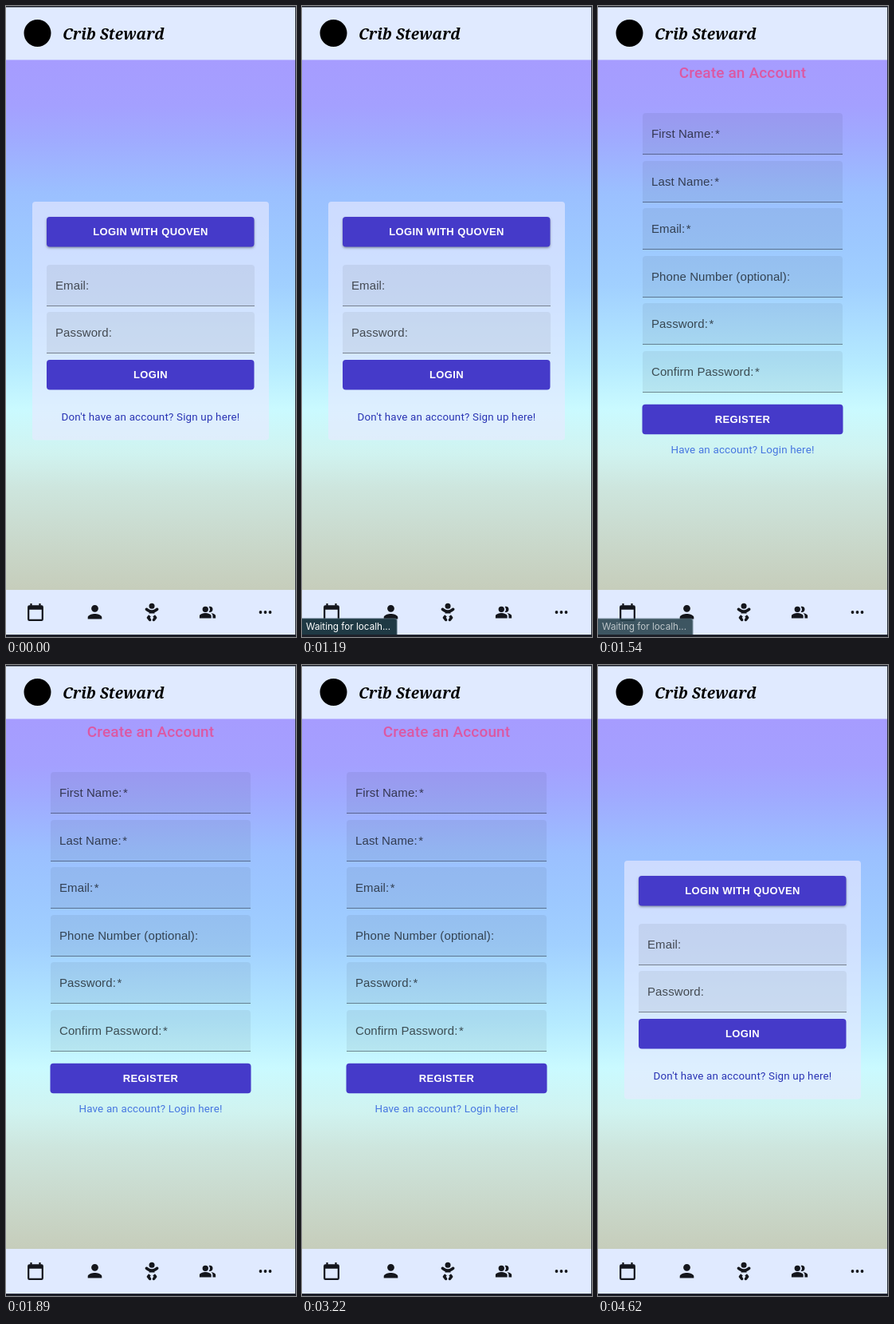
Recreate the animation shown at these times as an HTML page with a canvas. Size 364 by 790 pixels, loop 4.69 s.

```html
<!DOCTYPE html>
<html lang="en">
<head>
<meta charset="utf-8">
<title>Crib Steward</title>
<style>
  html, body { margin: 0; width: 100%; height: 100%; overflow: hidden; background: #e0eaff; }
  canvas { display: block; width: 364px; height: 790px; }
</style>
</head>
<body>
<canvas id="stage"></canvas>
<script>
const W = 364, H = 790, LOOP = 4690, STEP = 70, MID = 181.5;
// The tapped link fades, the status bubble comes up, then the next page is painted.
const TAP = 840, TAP_FADE = 910, TAP_END = 1050;
const STATUS_IN = 1050, STATUS_FULL = 1190, STATUS_FADE = 1470, STATUS_END = 1680;
const REGISTER = 1260, BACK = 3640;
const INK = '#14161c', BAR = '#e0eaff';
const SANS = '"Liberation Sans", Arial, sans-serif';
const ROUND = 'Roboto, sans-serif';

const canvas = document.getElementById('stage');
const ratio = window.devicePixelRatio || 1;
canvas.width = W * ratio;
canvas.height = H * ratio;
const ctx = canvas.getContext('2d');

const sky = ctx.createLinearGradient(0, 68, 0, 731);
[[68, '#a69cff'], [125, '#a4a0ff'], [165, '#a0aaff'], [235, '#9bc0ff'], [300, '#9dc9ff'], [350, '#a1d0ff'],
 [450, '#b6ebff'], [505, '#cafaff'], [560, '#d0f3f0'], [605, '#cde5dd'], [731, '#c6cdbb']]
  .forEach(([y, color]) => sky.addColorStop((y - 68) / 663, color));

const calendarIcon = new Path2D('M19 19H5V8h14zM16 1v2H8V1H6v2H5a2 2 0 0 0-2 2v14a2 2 0 0 0 2 2h14a2 2 0 0 0 2-2V5a2 2 0 0 0-2-2h-1V1z');
const personIcon = new Path2D('M12 12a4 4 0 1 0 0-8a4 4 0 0 0 0 8zm0 2c-2.67 0-8 1.34-8 4v2h16v-2c0-2.66-5.33-4-8-4z');
const peopleIcon = new Path2D('M16.67 13.13C18.04 14.06 19 15.32 19 17v3h4v-3c0-2.18-3.57-3.47-6.33-3.87z' +
  'M15 12a4 4 0 1 0 0-8c-.47 0-.91.1-1.33.24a6 6 0 0 1 0 7.52c.42.14.86.24 1.33.24z' +
  'M9 12a4 4 0 1 0 0-8a4 4 0 0 0 0 8z' +
  'M9 13c-2.67 0-8 1.34-8 4v3h16v-3c0-2.66-5.33-4-8-4z');
const babyIcon = new Path2D('M192 160a80 80 0 1 0 0-160a80 80 0 0 0 0 160z' +
  'm-53.4 248.8l25.6-32-61.5-51.2L56.8 383c-11.4 14.2-11.7 34.4-.8 49l48 64c7.9 10.5 19.9 16 32 16 8.3 0 16.8-2.6 24-8 17.7-13.2 21.2-38.3 8-56z' +
  'm142.7-83.2l-61.5 51.2 25.6 32L216 448c-13.2 17.7-9.7 42.8 8 56 7.2 5.4 15.6 8 24 8 12.2 0 24.2-5.5 32-16l48-64c10.9-14.6 10.6-34.8-.8-49z' +
  'M376.7 145c-12.7-18.1-37.6-22.4-55.7-9.8l-40.6 28.5c-52.7 37-124.2 37-176.8 0L63 135.3C44.9 122.6 20 127 7.3 145-5.4 163.1-1 188 17 200.7l40.6 28.5c17 11.9 35.4 20.9 54.4 27.9V288h160v-30.8c19-7 37.4-16 54.4-27.9l40.6-28.5c18.1-12.8 22.4-37.7 9.7-55.8z');

function box(x, y, w, h, color, radius = 0) {
  ctx.fillStyle = color;
  ctx.beginPath();
  ctx.roundRect(x, y, w, h, radius);
  ctx.fill();
}

function dot(x, y, r, color = INK) {
  ctx.fillStyle = color;
  ctx.beginPath();
  ctx.arc(x, y, r, 0, Math.PI * 2);
  ctx.fill();
}

function text(string, x, y, font, color, spacing = 0, align = 'left') {
  ctx.font = font;
  ctx.fillStyle = color;
  ctx.letterSpacing = spacing + 'px';
  ctx.textAlign = align;
  ctx.fillText(string, x, y);
  return ctx.measureText(string).width;
}

function icon(path, x, y, scale) {
  ctx.save();
  ctx.translate(x, y);
  ctx.scale(scale, scale);
  ctx.fillStyle = INK;
  ctx.fill(path, 'evenodd');
  ctx.restore();
}

function faded(alpha, paint) {
  if (alpha <= 0) return;
  ctx.save();
  ctx.globalAlpha = alpha;
  paint();
  ctx.restore();
}

// Rises over [a, b], stays, falls over [c, d].
function pulse(t, a, b, c, d) {
  if (t < a || t >= d) return 0;
  if (t < b) return (t - a) / (b - a);
  return t < c ? 1 : (d - t) / (d - c);
}

function button(label, x, y, w, raised) {
  ctx.save();
  if (raised) {
    ctx.shadowColor = 'rgba(0,0,0,.35)';
    ctx.shadowBlur = 3 * ratio;
    ctx.shadowOffsetY = 1.5 * ratio;
  }
  box(x, y, w, 37.5, '#453ac9', 4);
  ctx.restore();
  text(label, MID, y + 23.2, `bold 13px ${SANS}`, '#fff', 0.4, 'center');
}

function field(label, x, y, w, required) {
  box(x, y, w, 52, 'rgba(0,0,0,.06)', [4, 4, 0, 0]);
  box(x, y + 51, w, 1, 'rgba(0,0,0,.4)');
  const color = 'rgba(0,0,0,.66)', font = `15px ${SANS}`;
  const width = text(label, x + 11, y + 30.5, font, color, 0.1);
  if (required) text('*', x + 12.5 + width, y + 30.5, font, color);
}

function link(label, y, color) {
  text(label, MID, y, `13.4px ${ROUND}`, color, 0.18, 'center');
}

function drawFrame() {
  box(0, 0, W, H, sky);
  box(0, 0, W, 67.5, BAR);
  box(0, 731, W, 56, BAR);
  dot(39.5, 34, 17, '#000');
  text('Crib Steward', 71, 42, 'italic bold 19px "Noto Serif", serif', '#000');

  icon(calendarIcon, 23.8, 746.9, 1.1);
  icon(personIcon, 98.3, 745.5, 1.1);
  icon(babyIcon, 174.6, 747.8, 0.044);
  icon(peopleIcon, 242, 748, 0.92);
  for (const x of [319.5, 325.5, 331.5]) dot(x, 759, 1.9);
}

function drawEdges() {
  box(0, 0, W, 1.5, '#171a22');
  box(363, 0, 1, H, '#2a2d38');
  box(0, 787, W, 3, '#1d2029');
}

function drawLogin(t) {
  const tap = pulse(t, TAP, TAP, TAP_FADE, TAP_END);
  box(33, 245, 297, 298.5, 'rgba(232,234,255,.65)', 4);
  button('LOGIN WITH QUOVEN', 51, 264, 260.5, true);
  field('Email:', 51, 324, 261);
  field('Password:', 51, 383, 261);
  button('LOGIN', 51, 443, 260.5);
  faded(tap, () => {
    box(69, 505, 225, 19, '#a8cdf0');
    box(282, 737, 34.5, 29.5, '#a9b0c2', 3);
  });
  link("Don't have an account? Sign up here!", 519, tap > 0 ? '#7568a8' : '#2934b4');
}

function drawRegister() {
  text('Create an Account', MID, 90, `500 19px ${ROUND}`, '#dc58a4', 0.15, 'center');
  ['First Name:', 'Last Name:', 'Email:', 'Phone Number (optional):', 'Password:', 'Confirm Password:']
    .forEach((label, i) => field(label, 56, Math.round(134 + i * 59.5), 251, i !== 3));
  button('REGISTER', 55.5, 498.7, 252);
  link('Have an account? Login here!', 560, '#4676e0');
}

function drawStatus() {
  box(0, 766.5, 119.5, 20.5, '#48606c', [0, 3, 0, 0]);
  box(0, 767.5, 118.5, 19.5, '#1f3944', [0, 3, 0, 0]);
  text('Waiting for localh...', 5, 781, '11.7px Inter, sans-serif', '#fff');
}

function draw(t) {
  ctx.setTransform(ratio, 0, 0, ratio, 0, 0);
  drawFrame();
  if (t >= REGISTER && t < BACK) drawRegister();
  else drawLogin(t);
  faded(pulse(t, STATUS_IN, STATUS_FULL, STATUS_FADE, STATUS_END), drawStatus);
  drawEdges();
}

const start = performance.now();
function tick() {
  const t = (performance.now() - start) % LOOP;
  draw(Math.floor(t / STEP) * STEP);
  requestAnimationFrame(tick);
}
tick();
</script>
</body>
</html>
```
